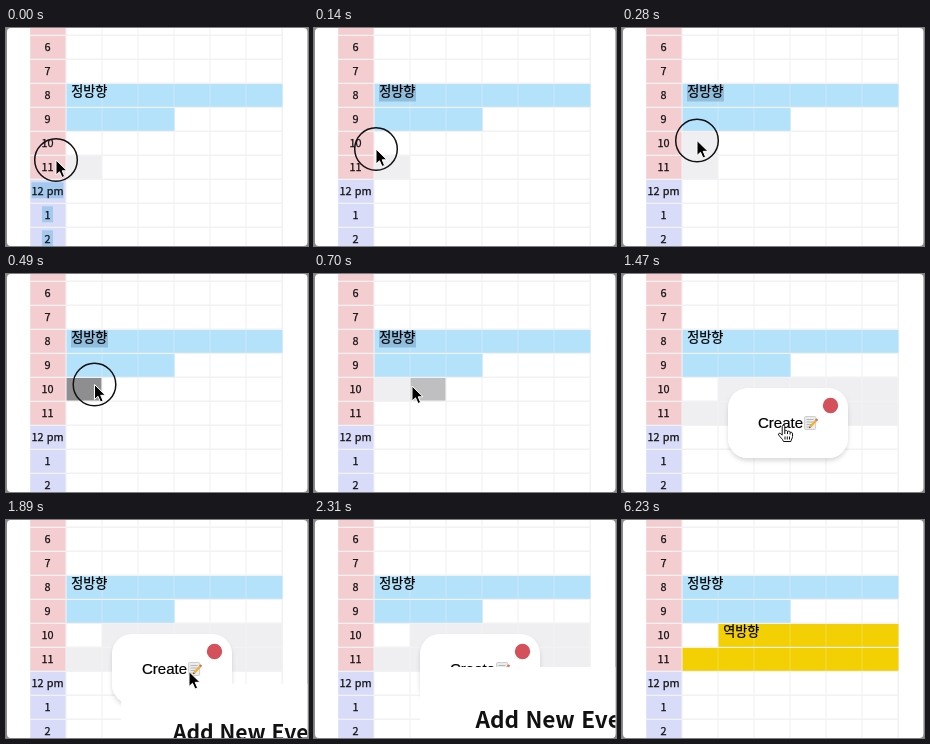
An HTML page for the animation above (6.65 s loop, 302 by 218 pixels).

```html
<!DOCTYPE html>
<html lang="ko">
<head>
<meta charset="utf-8">
<title>Calendar drag</title>
<style>
html, body { margin: 0; width: 100%; height: 100%; overflow: hidden; background: #8a8a8a; }
svg { display: block; width: 100vw; height: 100vh; }
text { font-family: "Noto Sans CJK KR", "Noto Sans CJK JP", "Noto Sans CJK", "Noto Sans", sans-serif; }
.hour { font-size: 10.9px; font-weight: 500; text-anchor: middle; fill: #111; stroke: #111; stroke-width: .25px; }
.event { font-size: 13.1px; fill: #000; stroke: #000; stroke-width: .25px; }
.create { font: 15px "Liberation Sans", Arial, sans-serif; stroke: #000; stroke-width: .2px; }
.heading { font-size: 22.6px; font-weight: 700; fill: #111; }
</style>
</head>
<body>
<svg viewBox="0 0 302 218" preserveAspectRatio="none">
  <defs>
    <clipPath id="frame"><rect x="1" width="300.4" height="218" rx="4"/></clipPath>
    <filter id="soft" x="-20%" y="-20%" width="140%" height="150%">
      <feDropShadow dx="0" dy="3" stdDeviation="2" flood-color="#000" flood-opacity=".14"/>
    </filter>
  </defs>
  <g clip-path="url(#frame)">
    <rect width="302" height="218" fill="#fff"/>
    <rect x="24" width="253" height="218" fill="#f2f2f3"/>
    <g id="cells"></g>
    <g id="marks" fill="#a4c9ef"></g>
    <g id="hours"></g>
    <g id="blue"></g>
    <g id="yellow"></g>
    <rect id="titleMark" x="65" y="56.5" width="37" height="17" fill="#91bddd"/>
    <text class="event" x="65.2" y="67.7">정방향</text>
    <text class="event" id="second" x="101.2" y="115.7">역방향</text>

    <g id="popup">
      <rect x="106" y="114" width="120" height="70" rx="20" fill="#fff" filter="url(#soft)"/>
      <circle cx="208.5" cy="131.5" r="7.7" fill="#d4505a"/>
      <text class="create" x="136" y="153.9">Create</text>
      <g transform="translate(182 141.5)">
        <rect x=".6" y="1" width="11" height="13" rx="1" fill="#ececea" stroke="#b9bcc0" stroke-width=".7"/>
        <path d="M2.5 4H9.5M2.5 6.5H9.5M2.5 9H8M2.5 11.5H7" stroke="#a5a9ae" stroke-width=".8"/>
        <path d="M6 11.5L12.5 4.5" stroke="#efb02c" stroke-width="2.3"/>
        <path d="M12 5L13.4 3.5" stroke="#dd6a70" stroke-width="2.3"/>
        <path d="M5 12.7L5.4 10.9L6.9 12.2Z" fill="#444"/>
      </g>
    </g>

    <g id="modal">
      <rect x="106" y="147" width="276" height="506" rx="3" fill="#fff"/>
      <text class="heading" x="161.5" y="207.5">Add New Event</text>
    </g>

    <circle id="ring" r="21.3" fill="none" stroke="#111" stroke-width="1.5"/>
    <path id="arrow" d="M0 0V15L3.5 11.8L6 17.5L8.6 16.4L6.2 10.8H11Z" fill="#000" stroke="#fff" stroke-width="1" stroke-linejoin="round"/>
    <path id="hand" d="M-1.3 1C-1.3 -.7 1.3 -.7 1.3 1V5.5C2 4.6 3.8 4.9 4 6C5 5.2 6.4 5.7 6.6 6.8C7.8 6.3 9 7 9 8.4V11C9 13 7.6 14 7.4 16H0C-.8 13.4 -3.2 12 -5 9.3C-5.6 7.8 -3.7 7.2 -2.7 8.3L-1.3 9.6ZM1.3 5.5V8.5M4 6V8.6M6.6 6.8V9M1.5 11V14M3.8 11V14M6 11V14" fill="#fff" stroke="#111" stroke-width="1" stroke-linejoin="round"/>
  </g>
</svg>
<script>
const LOOP = 6650, TICK = 70;
const LEFT = 60.5, TOP = 56, COL = 36, ROW = 24;
const LIGHT = [239, 239, 241], DARK = [142, 142, 144], WHITE = [255, 255, 255];
const $ = id => document.getElementById(id);

function add(parent, tag, attrs, text = '') {
  const el = document.createElementNS('http://www.w3.org/2000/svg', tag);
  for (const k in attrs) el.setAttribute(k, attrs[k]);
  el.textContent = text;
  parent.append(el);
  return el;
}
const show = (id, on) => $(id).style.display = on ? '' : 'none';
const rowY = hour => TOP + (hour - 8) * ROW;
const clamp = v => Math.max(0, Math.min(1, v));
const mix = (a, b, k) => a.map((v, i) => v + (b[i] - v) * k);

// Interpolate [time, ...values] keys
function track(keys, t) {
  let i = 0;
  while (i < keys.length - 2 && t >= keys[i + 1][0]) i++;
  const a = keys[i], b = keys[i + 1];
  return mix(a, b, clamp((t - a[0]) / (b[0] - a[0]))).slice(1);
}

const cells = {};
for (let h = 5; h <= 14; h++) {
  const y = rowY(h);
  add($('cells'), 'rect', { x: 24.3, y, width: 35.2, height: 22.7, fill: h < 12 ? '#f4cdd1' : '#d9dcf9' });
  for (let c = 0; c < 6; c++)
    cells[h + ':' + c] = add($('cells'), 'rect', { x: LEFT + c * COL + .1, y, width: 34.8, height: 22.5, fill: '#fff' });
  const label = h === 12 ? '12 pm' : String(h > 12 ? h - 12 : h);
  add($('hours'), 'text', { class: 'hour', x: 41.5, y: y + 14.8 }, label);
  if (h > 11) {
    const w = h === 12 ? 32 : 11;
    add($('marks'), 'rect', { x: 41.5 - w / 2, y: y + 2.3, width: w, height: 16 });
  }
}

function bar(group, hour, from, to, fill) {
  const y = rowY(hour);
  add($(group), 'rect', { x: LEFT + from * COL, y, width: (to - from) * COL, height: 22.8, fill });
  for (let c = from + 1; c < to; c++)
    add($(group), 'rect', { x: LEFT + c * COL - 1.1, y, width: 1.2, height: 22.8, fill: '#fff', opacity: .22 });
}
bar('blue', 8, 0, 6, '#b5e2fb');
bar('blue', 9, 0, 3, '#b5e2fb');
bar('yellow', 10, 1, 6, '#f2d003');
bar('yellow', 11, 0, 6, '#f2d003');

const pointer = [
  [0, 50, 132], [140, 62, 121], [280, 75, 112.5], [490, 88.5, 110.5], [560, 93.5, 111],
  [630, 93.5, 111], [700, 98, 112], [840, 107, 113], [910, 107, 115], [1400, 107, 115],
  [1470, 161.5, 151.5], [1540, 171, 158], [1610, 179, 158], [1680, 184, 155], [1750, 183, 151.5]
];
const pop = [[1800, .7], [1935, 1.05], [2040, .95], [2100, 1]];

function cellColor(hour, col, t) {
  if (t >= 6230) return WHITE;
  if (t >= 910) return hour === 11 || col > 0 ? LIGHT : WHITE;
  if (hour === 11) return col ? WHITE : mix(LIGHT, WHITE, clamp((t - 280) / 140));
  if (col === 0) {
    if (t < 210) return WHITE;
    return t < 700 ? mix(LIGHT, DARK, clamp((t - 280) / 140)) : LIGHT;
  }
  return col === 1 && t >= 700 ? mix(LIGHT, DARK, clamp((t - 630) / 140)) : WHITE;
}

function draw(time) {
  const t = Math.floor(time / TICK) * TICK;
  for (const h of [10, 11])
    for (let c = 0; c < 6; c++)
      cells[h + ':' + c].setAttribute('fill', `rgb(${cellColor(h, c, t).map(Math.round)})`);

  show('marks', t < 140);
  show('titleMark', t >= 140 && t < 910);
  show('popup', t >= 910 && t < 6230);
  show('modal', t >= 1890 && t < 6230);
  show('yellow', t >= 6230);
  show('second', t >= 6230);

  const [s] = track(pop, t);
  $('modal').setAttribute('transform', `translate(244 400) scale(${s}) translate(-244 -400)`);

  const [x, y] = track(pointer, t);
  const overButton = t >= 1470 && t < 1890;
  for (const id of ['ring', 'arrow', 'hand']) $(id).setAttribute('transform', `translate(${x} ${y})`);
  show('ring', t < 700);
  show('arrow', t < 2310 && !overButton);
  show('hand', overButton);
}

const start = performance.now();
function loop() {
  draw((performance.now() - start) % LOOP);
  requestAnimationFrame(loop);
}
loop();
</script>
</body>
</html>
```
